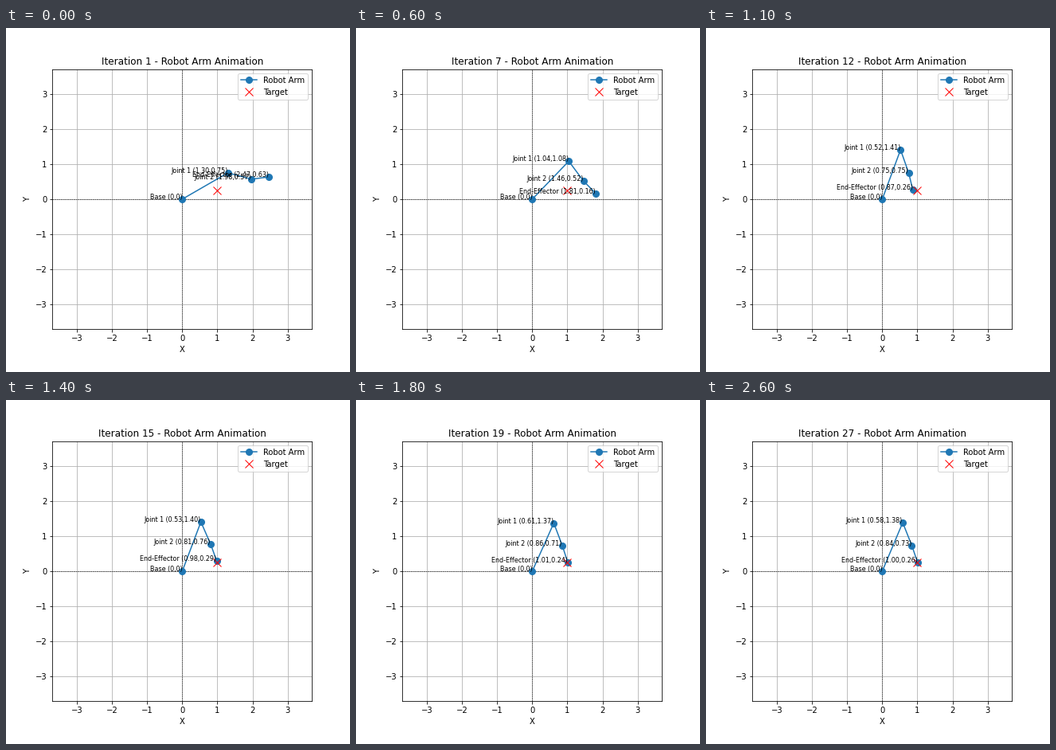
These frames come from a looping animation (432 by 432 pixels, 2.7 s). A matplotlib script:

```python
import matplotlib.pyplot as plt
import numpy as np
from matplotlib.animation import FuncAnimation

LENGTHS = np.array([1.5, 0.7, 0.5])
TARGET = (1, 0.25)
STEPS = 27
REACH = LENGTHS.sum() + 1

# Poses of the solver: iteration, then absolute link angles in degrees
POSES = np.array([
    [1, 30, -15, 7.5],
    [5, 34.66, -35, -17.7],
    [9, 58.66, -69.1, -70.1],
    [12, 69.7, -70.7, -76.3],
    [15, 69.3, -66.45, -70.1],
    [19, 65.9, -69.3, -72.2],
    [27, 67.2, -68.3, -71.2],
])
KNOTS, ANGLES = POSES[:, 0], POSES[:, 1:]
SLOPES = np.gradient(ANGLES, KNOTS, axis=0)
SLOPES[0] = 0, -3.5, -4


def link_angles(n):
    """Cubic Hermite interpolation between the poses."""
    i = min(np.searchsorted(KNOTS, n, side="right") - 1, len(KNOTS) - 2)
    h = KNOTS[i + 1] - KNOTS[i]
    t = (n - KNOTS[i]) / h
    s = t * t * (3 - 2 * t)
    return ((1 - s) * ANGLES[i] + s * ANGLES[i + 1]
            + h * t * (1 - t) * ((1 - t) * SLOPES[i] - t * SLOPES[i + 1]))


def joints(n):
    a = np.radians(link_angles(n))
    x = np.concatenate([[0], np.cumsum(LENGTHS * np.cos(a))])
    y = np.concatenate([[0], np.cumsum(LENGTHS * np.sin(a))])
    return x, y


fig, ax = plt.subplots(figsize=(6, 6), dpi=72)
fig.subplots_adjust(left=0.125, right=0.9, bottom=0.125, top=0.88)
ax.set_xlim(-REACH, REACH)
ax.set_ylim(-REACH, REACH)
ax.set_aspect("equal")
ax.grid(True)
ax.axhline(0, color="black", linewidth=0.5, linestyle="--")
ax.axvline(0, color="black", linewidth=0.5, linestyle="--")
ax.set_xlabel("X")
ax.set_ylabel("Y")

arm, = ax.plot([], [], "o-", markersize=8, label="Robot Arm")
ax.plot(*TARGET, "rx", markersize=10, label="Target")
ax.legend(loc="upper right")
title = ax.set_title("")

ax.text(0, 0, "Base (0,0)", fontsize=8, ha="right")
NAMES = ["Joint 1", "Joint 2", "End-Effector"]
labels = [ax.text(0, 0, "", fontsize=8, ha="right") for _ in NAMES]


def update(frame):
    n = frame + 1
    x, y = joints(n)
    arm.set_data(x, y)
    for label, name, px, py in zip(labels, NAMES, x[1:], y[1:]):
        label.set_position((px, py))
        label.set_text(f"{name} ({px:.2f},{py:.2f})")
    title.set_text(f"Iteration {n} - Robot Arm Animation")
    return [arm, title, *labels]


anim = FuncAnimation(fig, update, frames=STEPS, interval=100,
                     repeat=True, repeat_delay=0)
plt.show()
```
